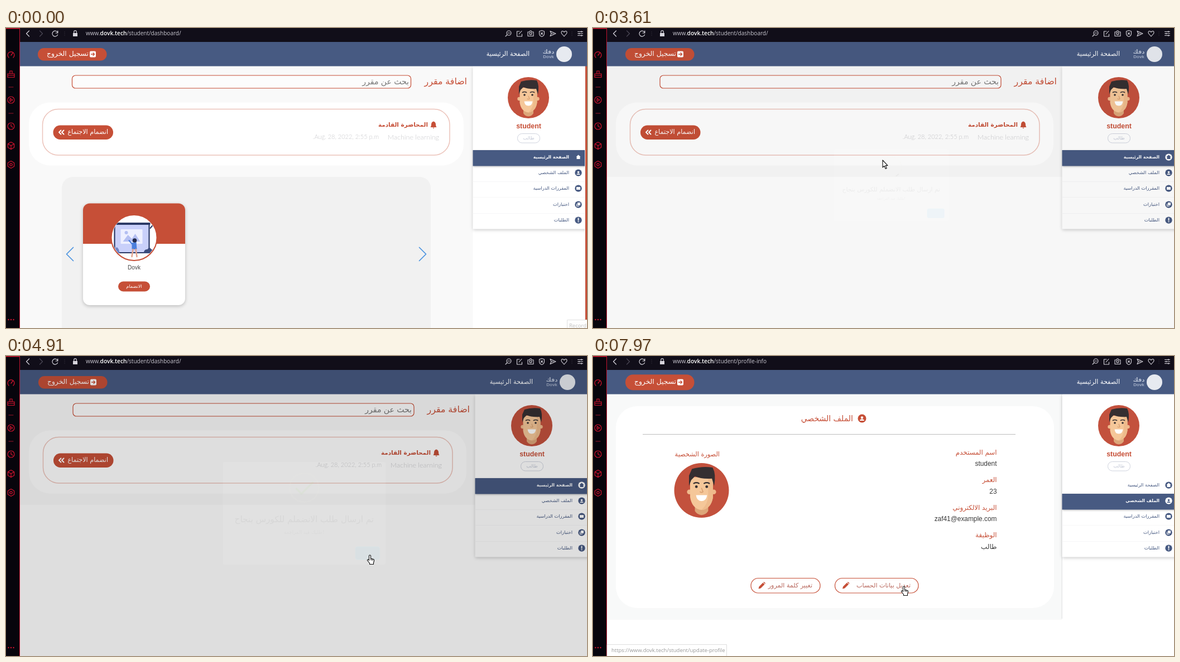
These frames come from a looping animation (1041x538 px, 8000 ms). An HTML page with a canvas:

```html
<!DOCTYPE html>
<html lang="ar">
<head>
<meta charset="utf-8">
<title>Student dashboard</title>
<style>
  html, body { margin: 0; width: 100%; height: 100%; overflow: hidden; background: #fff; }
  canvas { display: block; }
</style>
</head>
<body>
<canvas id="stage" width="1041" height="538"></canvas>
<script>
const ctx = document.getElementById('stage').getContext('2d');
const LOOP = 8000;
const NAVY = '#475a82', RUST = '#c64f37', RED = '#d3142f', WHITE = '#fff', CHROME = '#d6d4dc';

const bursts = [[100, 870, 9], [970, 1670, 8], [1990, 2390, 5], [3610, 4410, 9], [4510, 5220, 8],
  [5320, 5920, 7], [6120, 6420, 4], [6640, 6940, 4], [7140, 7140, 1], [7640, 7970, 4]];
const grabs = [0];
for (const [a, b, n] of bursts)
  for (let i = 0; i < n; i++) grabs.push(Math.floor((a + (b - a) * i / Math.max(1, n - 1)) / 10) * 10);

// Pointer route: [time, x, y, is hand]
const route = [[100, 1024, 514, 0], [400, 800, 400, 0], [670, 630, 338, 0], [870, 569, 362, 0], [970, 566, 368, 0],
  [1300, 390, 425, 0], [1570, 236, 456, 1], [1670, 231, 456, 1], [1990, 231, 456, 1], [2090, 290, 420, 0],
  [2390, 519, 237, 0], [4410, 519, 237, 0], [4710, 652, 357, 1], [4930, 652, 357, 1], [5010, 680, 350, 0],
  [5220, 880, 282, 0], [5320, 941, 262, 1], [5720, 941, 262, 1], [5920, 978, 270, 1], [6540, 978, 270, 1],
  [6640, 940, 274, 0], [6940, 690, 290, 0], [7560, 690, 290, 0], [7860, 570, 400, 0], [7960, 557, 413, 1]];

const lerp = (a, b, p) => a + (b - a) * p;
const clamp = p => Math.max(0, Math.min(1, p));
const smooth = p => p * p * (3 - 2 * p);
const circ = r => `M${r} 0A${r} ${r} 0 1 1 ${-r} 0A${r} ${r} 0 1 1 ${r} 0Z`;

function rect(x, y, w, h, fill, r = 0, stroke, lw = 1) {
  ctx.beginPath();
  ctx.roundRect(x, y, w, h, r);
  if (fill) { ctx.fillStyle = fill; ctx.fill(); }
  if (stroke) { ctx.strokeStyle = stroke; ctx.lineWidth = lw; ctx.stroke(); }
}

function shape(x, y, d, fill, stroke, lw = 1.1, scale = 1) {
  ctx.save();
  ctx.translate(x, y);
  ctx.scale(scale, scale);
  const path = new Path2D(d);
  if (fill) { ctx.fillStyle = fill; ctx.fill(path); }
  if (stroke) {
    ctx.strokeStyle = stroke; ctx.lineWidth = lw;
    ctx.lineCap = ctx.lineJoin = 'round';
    ctx.stroke(path);
  }
  ctx.restore();
}
const line = (x, y, d, color, lw) => shape(x, y, d, null, color, lw);

function text(s, x, y, size, color, align = 'right', weight = 400, family) {
  const arabic = /[\u0600-\u06ff]/.test(s);
  family ??= arabic ? 'DejaVu Sans' : 'Liberation Sans';
  ctx.font = `${weight} ${size}px "${family}", sans-serif`;
  ctx.direction = arabic ? 'rtl' : 'ltr'; // also decides how Arabic is measured
  ctx.textAlign = align;
  ctx.textBaseline = 'middle';
  ctx.fillStyle = color;
  ctx.fillText(s, x, y);
  return ctx.measureText(s).width;
}

function shadowed(draw, blur = 6, dy = 2) {
  ctx.save();
  ctx.shadowColor = 'rgba(0,0,0,.22)';
  ctx.shadowBlur = blur;
  ctx.shadowOffsetY = dy;
  draw();
  ctx.restore();
}

const HEX = 'M0-6.5L5.6-3.2V3.2L0 6.5L-5.6 3.2V-3.2Z';
const USER = circ(2) + 'M-3.6 5Q-3.6 2.6 0 2.6Q3.6 2.6 3.6 5Z';

function browser(path, loading) {
  rect(0, 0, 1041, 25, '#110e19');
  rect(0, 0, 25, 538, '#07050c');
  rect(0, 0, 25, 1.5, RED);
  rect(24, 0, 1, 538, '#c0132e');
  line(9, 48, 'M-4 5A6 6 0 1 1 4 5M0 1L3-3', RED, 1.3);
  line(9, 83, 'M-6-1H6V5.5H-6ZM-2-1V-6H2V-1M-6 2H6', RED, 1.2);
  for (const y of [106, 153]) line(9, y, 'M-4 0H4', '#9c1528', 1);
  line(9, 129, circ(6) + 'M-1.8-2.8L2.8 0L-1.8 2.8Z', RED, 1.2);
  line(9, 176, circ(6) + 'M0-3.5V0L3 2', RED, 1.2);
  line(9, 211, HEX + 'M-5.6-3.2L0 0L5.6-3.2M0 0V6.5', RED, 1.2);
  line(9, 245, HEX + circ(2.2), RED, 1.2);
  for (const x of [4.5, 9, 13.5]) shape(x, 523, circ(1.2), RED);

  line(39, 10, 'M2.5-5L-2.5 0L2.5 5', CHROME, 1.2);
  line(63, 10, 'M-2.5-5L2.5 0L-2.5 5', '#4b4755', 1.2);
  line(88, 10, loading ? 'M-3.5-3.5L3.5 3.5M3.5-3.5L-3.5 3.5' : 'M4.8-1A5 5 0 1 0 4.6 2M4.8-5V-1H1', CHROME, 1.2);
  for (const x of [105, 1014]) line(x, 10, 'M0-3V-2.9M0 0V.1M0 3V3.1', '#4b4755', 1);
  shape(124, 10, 'M-4-1H4V5H-4Z', CHROME);
  line(124, 10, 'M-2.3-1V-3A2.3 2.3 0 0 1 2.3-3V-1', CHROME, 1.2);
  let x = 143;
  x += text('www.', x, 10, 10, '#c9c7d0', 'left', 400, 'Open Sans');
  x += text('dovk.tech', x, 10, 10.2, WHITE, 'left', 600, 'Open Sans');
  text('/student/' + path, x, 10, 10, '#c9c7d0', 'left', 400, 'Open Sans');
  line(901, 9, circ(4) + 'M-3 3L-6 6M-2 0H2', CHROME);
  line(920, 10, 'M0-4H-4.5V5H4.5V1M-1 1L4-4.5', CHROME);
  line(940, 10, 'M-5-3H-2L-1-5H1L2-3H5V4.5H-5Z' + circ(2), CHROME);
  line(960, 10, 'M0-5.5L4.5-4V0Q4.5 4 0 5.5Q-4.5 4-4.5 0V-4ZM-1.7-1.7L1.7 1.7M1.7-1.7L-1.7 1.7', CHROME);
  line(980, 10, 'M-5-4.5L5 0L-5 4.5L-3 0ZM-3 0H1', CHROME);
  line(1000, 10, 'M0 5L-4.5 0Q-6-4-3-4.5Q-1-4.5 0-2.5Q1-4.5 3-4.5Q6-4 4.5 0Z', CHROME);
  line(1029, 10, 'M-4.5-3.5H4.5M-4.5 0H4.5M-4.5 3.5H4.5M2-4.5V-2.5M-2-1V1M2 2.5V4.5', CHROME);
}

function avatar(x, y, r) {
  ctx.save();
  ctx.translate(x, y);
  ctx.scale(r / 37, r / 37);
  shape(0, 0, circ(37), '#c3513d');
  ctx.clip(new Path2D(circ(37)));
  shape(0, 0, 'M-9 18H9V28Q6 33 0 33.5Q-6 33-9 28Z', '#dda679');
  for (const side of [-1, 1]) shape(side * 16.5, 2, circ(3.2), '#efb98c');
  shape(0, 0, 'M-15.5-18H15.5V9Q13 25 0 26.5Q-13 25-15.5 9Z', '#f5c799');
  shape(0, 0, 'M9-18H15.5V9Q13 25 0 26.5Q9 18 9 6Z', '#eebb8c');
  shape(0, 0, 'M-17-6V-20L-13-29Q0-33 15-31Q20-22 17-6L14-16Q0-15-9-19L-14-14Z', '#352f31');
  for (const side of [-7, 7]) {
    shape(side, -5, circ(1.8), '#352f31');
    line(side, -10, 'M-3.5 .5Q0-1.5 3.5 .5', '#352f31', 1.7);
  }
  line(0, 0, 'M0-3L2 2Q0 3.5-2 2', '#d99f70', 1.2);
  shape(0, 7.5, 'M-7.5-1H7.5Q6.5 7 0 7Q-6.5 7-7.5-1Z', WHITE);
  ctx.restore();
}

function navbar(d, tall) {
  rect(25, 25, 1016, 43.5, NAVY);
  const x = d ? 1 : 0, grow = tall ? 2.7 : 0;
  rect(57 + x, 36 - grow, 123.5, 22.5 + grow * 2, RUST, 11 + grow);
  text('تسجيل الخروج', 148 + x, 47, 12.3, WHITE);
  rect(150 + x, 41.5, 11, 11, WHITE, 2);
  line(155.5 + x, 47, 'M-3 0H3M.5-2.5L3 0L.5 2.5', RUST, 1.4);
  text('الصفحة الرئيسية', 938 + d, 47, 11.2, WHITE);
  shape(1000 + d, 47, circ(14), '#e7eaf0');
  text('دفك', 972 + d, 43, 10, '#b5bfd3', 'center', 700);
  text('Dovk', 972 + d, 52, 8, '#a3aec6', 'center', 700);
}

function sidebar(d, active, hover) {
  const left = d ? 840.5 : 836.5;
  shadowed(() => rect(left, 68.5, 210, 291.5, WHITE));
  avatar(936 + d, 125, 37);
  text('student', 936.5 + d, 177, 12.4, RUST, 'center', 700);
  rect(916.5 + d, 189.5, 40, 16.5, null, 8, '#cfd3de');
  text('طالب', 936.5 + d, 198, 8.5, '#c3c8d6', 'center');
  const glyphs = ['M0-4L4-.5H3V3.5H-3V-.5H-4Z', USER, 'M-3.5-2.5H3.5V2.5H-3.5Z',
    'M-1.5-3.5H3.5V1.5H-1.5ZM-3.5-1.5V3.5H1.5V2.5H-2.5V-1.5Z', 'M-.9-4H.9V1H-.9ZM-.9 2H.9V3.6H-.9Z'];
  ['الصفحة الرئيسية', 'الملف الشخصي', 'المقررات الدراسية', 'اختبارات', 'الطلبات'].forEach((label, i) => {
    const top = 219 + Math.round(i * 28.2), y = top + 12.6;
    const on = i === active || i === hover, bare = !d && on;
    if (on) shadowed(() => rect(left, top, 210, 28.5, NAVY), 3, 1);
    else rect(left, top + 28, 210, .8, '#f3f3f4');
    text(label, 1009 + d, y, on ? 7.8 : 8.3, on ? WHITE : NAVY, 'right', on ? 700 : 400);
    if (!bare) shape(1025.5 + d, y, circ(6.2), on ? WHITE : NAVY);
    shape(1025.5 + d, y - (i === 1 ? 1 : 0), glyphs[i], on && !bare ? NAVY : WHITE, null, 1, i === 1 ? .9 : 1);
  });
}

function courses() {
  rect(100, 267, 661, 300, '#f1f1f1', 20);
  line(114.5, 405.5, 'M6-12L-6 0L6 12', '#4b93e0', 1.7);
  line(746.5, 405.5, 'M-6-12L6 0L-6 12', '#4b93e0', 1.7);
  shadowed(() => rect(138, 314.5, 183, 182.5, WHITE, 12));
  rect(138, 314.5, 183, 72.5, RUST, [12, 12, 0, 0]);
  shape(229.5, 376, circ(41), WHITE, RUST, 2);
  ctx.save();
  ctx.translate(229.5, 376);
  ctx.clip(new Path2D(circ(39.5)));
  rect(-35, -25, 62, 52, '#c9d0fa', 1, '#2c3a66', 2.2);
  rect(-37, -27, 66, 4, '#2c3a66', 1);
  rect(-24, -15, 39, 26, '#eef0ff', 1);
  shape(-4, -2, 'M-16 9L-7-3L0 4L6-5L15 9Z', '#b4bff2');
  shape(-14, -9, circ(3), '#b4bff2');
  shape(0, 10, 'M-4-1L4-2L5 11H-4Z', '#4b7fdd');
  line(0, 10, 'M-4 1L-9-5', '#4b7fdd', 2);
  shape(1, 5, circ(3.8), '#22294a');
  line(0, 21, 'M-2 0L-4 13M3 0L5 13', '#e2a48e', 2.6);
  shape(26, 25, 'M-9 3Q-8-5-2-4Q1-10 5-4Q10-4 9 3Z', '#3c4c7d');
  shape(-31, 24, 'M-5 4Q-3-6 0-7Q4-5 5 4Z', '#6f83c4');
  line(31, -20, 'M-2 3L3-3', '#2c3a66', 2);
  ctx.restore();
  text('Dovk', 229.5, 430, 10, '#444', 'center');
  rect(201, 454.5, 57, 18, RUST, 9);
  text('الانضمام', 229.5, 464, 8.2, WHITE, 'center');
}

function dashboard(d, hover) {
  const l = d ? 1 : 0, r = d ? 5 : 0;
  rect(25, 68, d ? 815.5 : 811.5, d ? 199 : 470, '#f9f9f9');
  sidebar(d, 0, hover);
  text('اضافة مقرر', 826 + r, 97, 15.8, RUST);
  rect(118.5 + l * 1.5, 85, 607 + r - l, 23, '#fcfcfc', 6, RUST, 1.2);
  text('بحث عن مقرر', 722 + r, 97, 14, '#777');
  rect(41, 133.5, 779 + r, 113, WHITE, 38);
  rect(65.5 + l, 145.5, 729.5 + r - l, 82.5, WHITE, 28, '#ecc3ba', 1.5);
  text('المحاضرة القادمة', 756 + r, 174, 10.4, RUST, 'right', 700);
  shape(766 + r, 174, 'M0-6.5Q4-5.5 4-1Q4 2 5.5 4H-5.5Q-4 2-4-1Q-4-5.5 0-6.5ZM-1.8 4.8H1.8Q0 7.5-1.8 4.8Z', RUST);
  text('Machine learning', 776 + r, 196, 12.5, '#c9c9cc', 'right', 300, 'Lato');
  text('.Aug. 28, 2022, 2:55 p.m', 668 + r, 196, 11, '#c9c9cc', 'right', 300, 'Lato');
  rect(84.5 + l * .5, 174.5, 107.5, 25.5, RUST, 12.5);
  text('انضمام الاجتماع', 183, 187, 11.2, WHITE);
  line(99.5, 187, 'M-1-3.5L-4.5 0L-1 3.5M4-3.5L.5 0L4 3.5', WHITE, 2);
  if (!d) {
    courses();
    rect(1037, 25, 4, 513, '#eee');
    rect(1038, 25, 3, 513, RUST);
  }
}

function profile() {
  rect(25, 68, 815.5, 405, '#f8f9f9');
  rect(839.5, 68, 1.5, 403, '#e6e7e8');
  sidebar(6, 1);
  rect(41, 90, 785, 362, WHITE, 38);
  text('الملف الشخصي', 466, 113, 14, RUST);
  shape(482, 112, circ(7.5), RUST);
  shape(482, 110.5, USER, WHITE, null, 1, 1.1);
  rect(89, 140, 668, 1, '#bdbdbd');
  text('الصورة الشخصية', 227, 177, 11.3, RUST);
  avatar(194.5, 241, 49);
  [['اسم المستخدم', 'student'], ['العمر', '23'], ['البريد الالكتروني', 'zaf41@example.com'], ['الوظيفة', 'طالب']]
    .forEach(([label, value], i) => {
      const y = 173.5 + i * 49.5;
      text(label, 723.5, y, 11.8, RUST);
      text(value, 723.5, y + 20.5, 11.9, '#3a3a3a');
    });
  for (const [x, w, label, right] of [[283, 124, 'تغيير كلمة المرور', 393], [433.5, 149.5, 'تعديل بيانات الحساب', 569]]) {
    rect(x, 398.5, w, 26.5, WHITE, 13, RUST, 1.2);
    text(label, right, 412, 11.1, '#b8675c');
    shape(x + 19.5, 411.5, 'M-6 6L-5 2L2-5L5-2L-2 5ZM2.7-5.7L4-6.5L6.5-4L5.7-2.7Z', RUST);
  }
}

function dialog(t) {
  const p = clamp((t - 3560) / 300), out = clamp((t - 4790) / 300);
  if (!p || out === 1) return;
  const stops = [[0, .5], [.45, 1.05], [.8, .95], [1, 1]];
  const i = Math.max(1, stops.findIndex(s => s[0] >= p));
  const [a, b] = [stops[i - 1], stops[i]];
  const scale = lerp(a[1], b[1], (p - a[0]) / (b[0] - a[0]));
  rect(25, 25, 1016, 513, `rgba(0,0,0,${.4 * smooth(p) * (1 - out) ** 2.2})`);
  ctx.save();
  ctx.globalAlpha = Math.min(1, smooth(p) * 1.08) * (1 - out) ** 5;
  ctx.translate(534.3, 282);
  ctx.scale(scale, scale);
  rect(-146, -92, 292, 184, WHITE, 3);
  line(0, -46, circ(26), '#edf1e4', 2.6);
  const age = t - 3560;
  if (age < 400) line(0, -46, 'M13 22Q16 21 18 18', '#8d9189', 2.6);
  const tip = clamp((age - 400) / 130), long = clamp((age - 500) / 200);
  if (tip) line(0, -46, `M-14 2L${lerp(-14, -5, tip)} ${lerp(2, 11, tip)}` +
    (long ? `L${lerp(-5, 15, long)} ${lerp(11, -9, long)}` : ''), '#a5dc86', 3.2);
  text('تم ارسال طلب الانضملم للكورس بنجاح', 0, 12, 15.2, '#6a6a6a', 'center');
  text('!طلبك قيد المراجعة', 0, 35, 8.8, '#a5a5a5', 'center');
  rect(92, 60, 43, 23, '#7cd1f9', 3, '#cfe9f7', 2);
  text('OK', 113.5, 72, 8.8, WHITE, 'center', 700);
  ctx.restore();
}

function status(path, width, x, alpha) {
  ctx.save();
  ctx.globalAlpha = alpha;
  rect(25, 517.5, width, 22, WHITE, 0, '#c9c9c9');
  text('https://www.dovk.tech/student/' + path, x, 529, 9.5, '#555', 'left', 400, 'Open Sans');
  ctx.restore();
}

function pointer(t) {
  if (t < 100) return;
  const next = route.findIndex(k => k[0] > t);
  const b = next < 0 ? route.at(-1) : route[next], a = next < 0 ? b : route[next - 1];
  const p = a === b ? 0 : (t - a[0]) / (b[0] - a[0]);
  const x = lerp(a[1], b[1], p), y = lerp(a[2], b[2], p);
  if (a[3]) {
    shape(x, y, 'M-1.5 1Q0-1 1.5 1V6L6.5 7.5Q8 8 7.6 10L6.5 14V16.5H-.5V14.5L-4.6 9.5Q-4.6 7.5-2.8 8L-1.5 9.5Z', WHITE, '#111', 1.1);
    line(x, y, 'M1.5 6V9M3.4 7V9.5M5.2 7.5V9.7', '#111', .8);
  } else shape(x, y, 'M0 0V13L3 10.3L5.2 15.5L7.3 14.6L5.1 9.6H9Z', WHITE, '#111', 1.1);
}

function draw(t) {
  const d = t < 3610 ? 0 : 6, onProfile = t >= 7140;
  ctx.clearRect(0, 0, 1041, 538);
  rect(25, 25, 1016, 513, WHITE);
  if (onProfile) profile();
  else dashboard(d, t >= 5320 ? 1 : -1);
  navbar(d, onProfile);
  dialog(t);
  browser(t >= 6640 ? 'profile-info' : 'dashboard/', t >= 1990 && t < 3610 || t >= 6120 && !onProfile);
  if (t >= 5420 && t < 6220) status('profile-info', 203, 31, 1);
  if (t >= 7960) status('update-profile', 214.5, 33, .6);
  if (t < 400) {
    ctx.globalAlpha = 1 - t / 400;
    rect(1005.5, 523.5, 40, 20, '#fdfdfd', 0, '#e2e2e2');
    text('Record', 1009, 535, 9.5, '#c2c2c2', 'left', 400, 'Open Sans');
    ctx.globalAlpha = 1;
  }
  pointer(t);
}

function tick() {
  const now = performance.now() % LOOP;
  draw(grabs.findLast(g => g <= now));
  requestAnimationFrame(tick);
}
tick();
</script>
</body>
</html>
```
